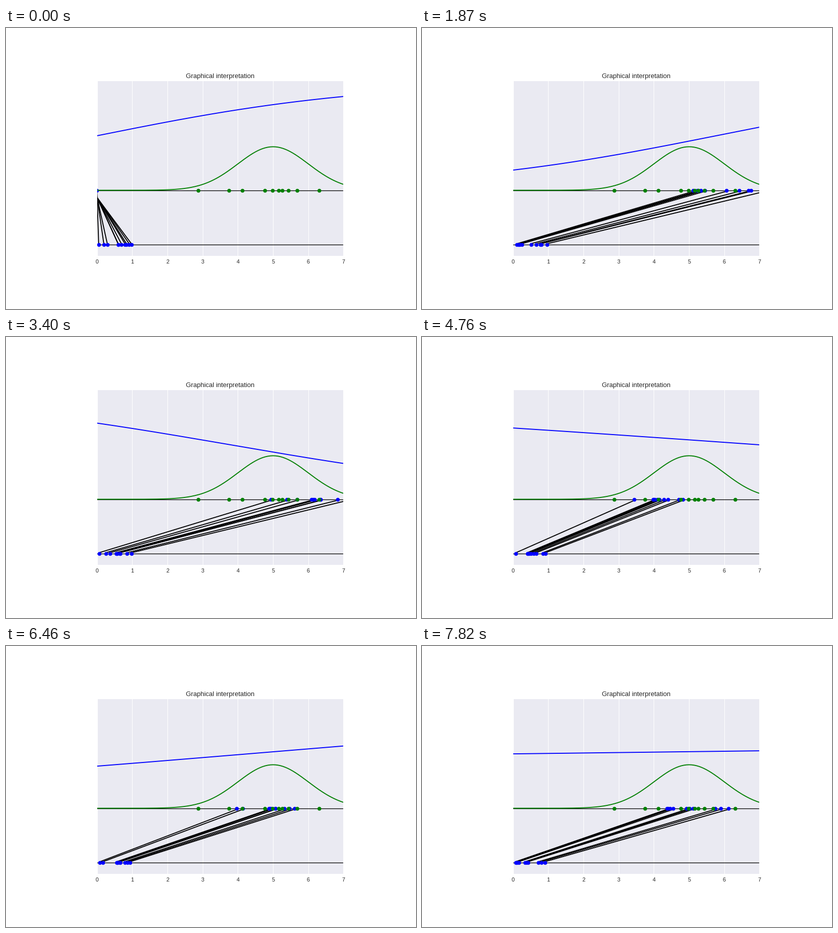
Write a matplotlib script that moves like this. It is 800 px wide and 550 px high and loops after 7990 ms.

```python
import numpy as np
import matplotlib.pyplot as plt
from matplotlib.animation import FuncAnimation

W, H, DPI = 800, 550, 100
LEFT, TOP, WIDTH, HEIGHT = 177.8, 104.1, 480.7, 341.6
SCALE = 0.775          # point sizes relative to the usual seaborn ones
FRAMES, STEP = 47, 170
BATCH = 10
INK = "#262626"
REAL = [2.875, 3.745, 4.12, 4.76, 4.985, 5.155, 5.265, 5.43, 5.68, 6.31]

plt.rcParams["font.family"] = ["Liberation Sans", "DejaVu Sans"]

# Key points of the training: step, discriminator bias and slope, generator shift
STEPS, BIAS, SLOPE, SHIFT = np.transpose([
    (0, 0.0, 0.259, 0.0),
    (5, -2.164, 0.604, 2.595),
    (11, -1.483, 0.257, 4.86),
    (20, 0.838, -0.222, 4.80),
    (28, 0.634, -0.091, 3.315),
    (38, -0.463, 0.107, 3.817),
    (46, -0.005, 0.016, 4.217),
])


def hermite(step, values, rates):
    """Cubic interpolation through the key points with given rates."""
    i = min(np.searchsorted(STEPS, step, side="right") - 1, len(STEPS) - 2)
    h = STEPS[i + 1] - STEPS[i]
    t = (step - STEPS[i]) / h
    s = 1 - t
    return (values[i] * s * s * (1 + 2 * t) + values[i + 1] * t * t * (3 - 2 * t)
            + h * (rates[i] * t * s * s - rates[i + 1] * t * t * s))


def discriminator(step, x):
    bias = hermite(step, BIAS, np.gradient(BIAS, STEPS))
    slope = hermite(step, SLOPE, np.gradient(SLOPE, STEPS))
    return 1 / (1 + np.exp(-bias - slope * x))


def generator(step, z):
    # the generator climbs the discriminator's slope
    shift = hermite(step, SHIFT, SLOPE)
    gain = shift / 2 - 0.137 * np.exp(-step / 12)
    return shift + gain * z


fig = plt.figure(figsize=(W / DPI, H / DPI), dpi=DPI, facecolor="white")
ax = fig.add_axes([LEFT / W, 1 - (TOP + HEIGHT) / H, WIDTH / W, HEIGHT / H],
                  facecolor="#EAEAF2")
ax.set(xlim=(0, 7), ylim=(-0.6, 1), xticks=range(8), yticks=[])
ax.spines[:].set_visible(False)
ax.set_axisbelow(True)
ax.grid(axis="x", color="white", lw=SCALE)
ax.tick_params(length=0, pad=7 * SCALE, labelsize=10 * SCALE, labelcolor=INK)
ax.set_title("Graphical interpretation", fontsize=12 * SCALE, color=INK,
             pad=6 * SCALE)

xs = np.linspace(0, 7, 200)
for level in (0, -0.5):
    ax.plot([0, 7], [level, level], color="black", lw=1.2 * SCALE)

thick = dict(lw=1.75 * SCALE)
dots = dict(ls="", marker="o", ms=7 * SCALE, mew=0)
links = [ax.plot([], [], color="black", **thick)[0] for _ in range(BATCH)]
inputs, = ax.plot([], [], color="blue", **dots)
fakes, = ax.plot([], [], color="blue", **dots)
ax.plot(REAL, np.zeros(len(REAL)), color="green", **dots)
ax.plot(xs, np.exp(-(xs - 5) ** 2 / 2) / np.sqrt(2 * np.pi), color="green", **thick)
score, = ax.plot([], [], color="blue", **thick)


def draw(step):
    score.set_data(xs, discriminator(step, xs))
    z = np.random.default_rng(100 + step).uniform(0, 1, BATCH)
    out = generator(step, z)
    inputs.set_data(z, np.full(BATCH, -0.5))
    fakes.set_data(out, np.zeros(BATCH))
    for link, a, b in zip(links, z, out):
        link.set_data([a, b], [-0.49, -0.01])
    return [score, inputs, fakes, *links]


anim = FuncAnimation(fig, draw, frames=FRAMES, interval=STEP, repeat=True,
                     repeat_delay=0, init_func=lambda: draw(0), blit=False)
plt.show()
```
